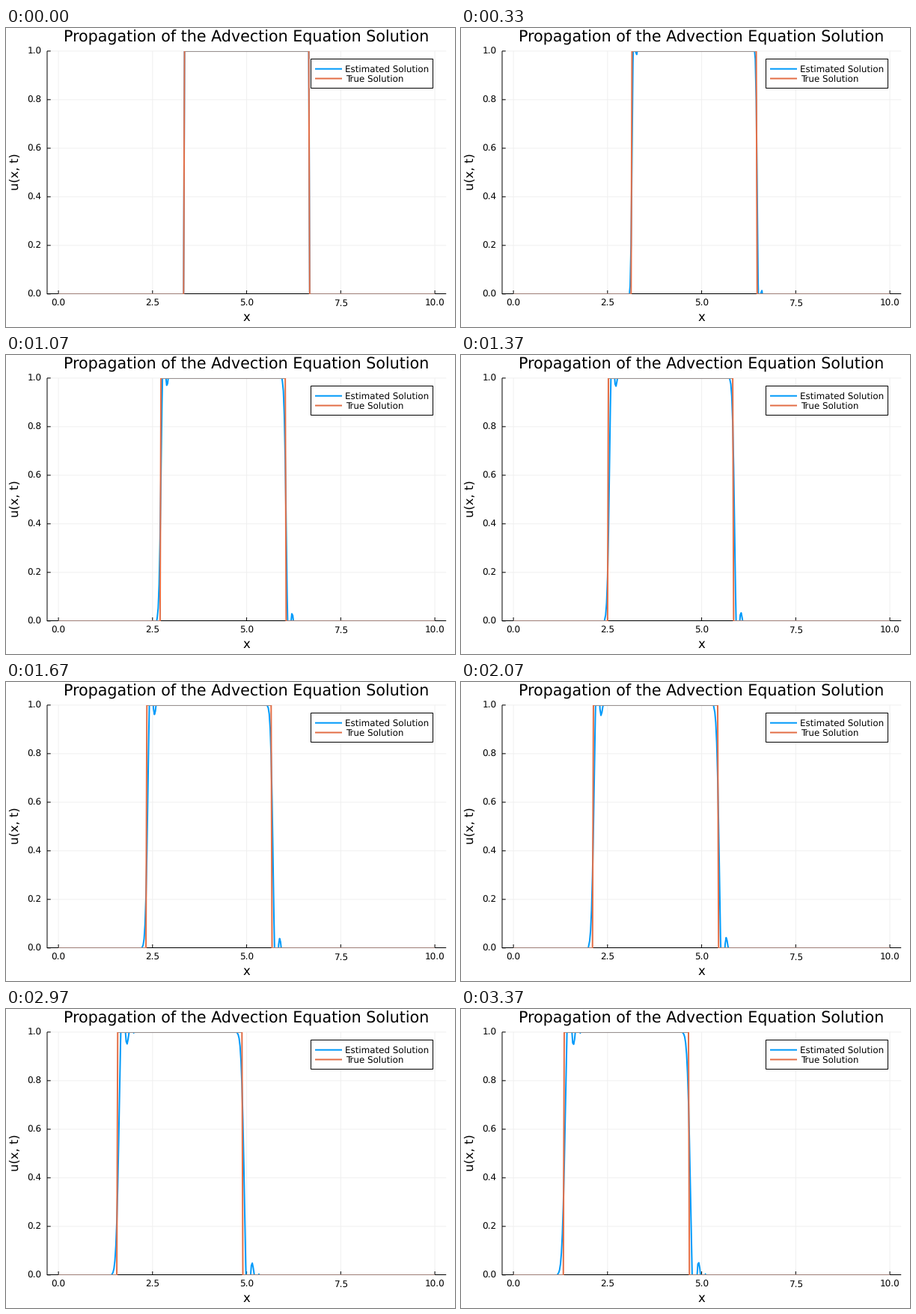
Animation, 600 px wide and 400 px high, one loop 3410 ms. Source, as a matplotlib script:

```python
import numpy as np
import matplotlib.pyplot as plt
from matplotlib.animation import FuncAnimation
from matplotlib.patches import Rectangle

plt.rcParams["font.family"] = "DejaVu Sans"
plt.rcParams["text.hinting"] = "none"
plt.rcParams["path.snap"] = False

W, H, DPI = 600, 400, 100
PX = 72 / DPI                       # points per pixel
LEFT, RIGHT, TOP, BOTTOM = 54.97, 588.19, 30.87, 355.8
BLUE, ORANGE = "#009AFA", "#E36F47"

# Advection to the left, u_t = u_x, solved with Lax-Wendroff
LENGTH, NX, T_END, NT = 10.0, 401, 2.0, 102
PULSE = 3.335, 6.66
TICK_MS, LOOP_MS = 10, 3410
x = np.linspace(0, LENGTH, NX)
dt = T_END / (NT - 1)
nu = dt / (x[1] - x[0])


def pulse(t):
    s = x + t
    return ((s >= PULSE[0]) & (s <= PULSE[1])).astype(float)


def lax_wendroff(u):
    right, left = np.roll(u, -1), np.roll(u, 1)
    return u + nu / 2 * (right - left) + nu**2 / 2 * (right - 2 * u + left)


estimates = [pulse(0)]
for _ in range(NT - 1):
    estimates.append(lax_wendroff(estimates[-1]))


def px(v):
    return LEFT + (np.asarray(v) + 0.3) / 10.6 * (RIGHT - LEFT)


def py(v):
    return BOTTOM - np.asarray(v) * (BOTTOM - TOP)


def hide_flats(u):
    """Push the flat levels just outside the clip area."""
    return np.where(u > 0.997, np.maximum(u, 1.01),
                    np.where(u < 0.003, np.minimum(u, -0.01), u))


fig = plt.figure(figsize=(W / DPI, H / DPI), dpi=DPI, facecolor="white")
ax = fig.add_axes([0, 0, 1, 1])
ax.set_xlim(0, W)
ax.set_ylim(H, 0)
ax.axis("off")


def stroke(xs, ys, color, width=1, z=2):
    return ax.plot(xs, ys, color=color, lw=width * PX, zorder=z,
                   solid_capstyle="butt")[0]


def label(cx, base, text, size, ha="center", **kw):
    ax.text(cx, base, text, fontsize=size * PX, ha=ha, va="baseline",
            zorder=8, **kw)


# Grid, ticks and tick labels
for v in np.arange(0, 10.1, 2.5):
    gx = float(px(v))
    stroke([gx, gx], [TOP, BOTTOM], "#f0f0f0", z=1)
    stroke([gx, gx], [BOTTOM, 351], "black")
    label(gx, 371.9, f"{v:.1f}", 12)
for v in np.arange(0, 1.01, 0.2):
    gy = float(py(v))
    stroke([LEFT, RIGHT], [gy, gy], "#f0f0f0", z=1)
    stroke([LEFT, 59.7], [gy, gy], "black")
    label(47.3, gy + 4.4, f"{v:.1f}", 12, ha="right")
stroke([LEFT, RIGHT], [355.5, 355.5], "black")
stroke([LEFT, LEFT], [TOP, 356], "black")

# Titles
label(321.3, 19, "Propagation of the Advection Equation Solution", 20.7)
label(321.6, 391.6, "x", 16.5)
label(17, 192.6, "u(x, t)", 16.4, rotation=90, rotation_mode="anchor")

# Legend
ax.add_patch(Rectangle((407.5, 41.5), 163, 39, fc="white", ec="black",
                       lw=PX, zorder=6))
stroke([413, 449], [54.7, 54.7], BLUE, 2, z=7)
stroke([413, 449], [67.6, 67.6], ORANGE, 2, z=7)
label(453.4, 58.9, "Estimated Solution", 11.9, ha="left")
label(454.4, 71.9, "True Solution", 11.9, ha="left")

# Moving curves, with blended strips where both lie on the plot's edge
top_strip = stroke([], [], "#98908f", z=4.5)
low_strips = [stroke([], [], "#a08078", z=4.5) for _ in range(2)]
estimate = stroke([], [], BLUE, 2, z=4)
truth = stroke([], [], ORANGE, 2, z=5)
clip = Rectangle((55, 31), 533, 325, transform=ax.transData)
for line in (estimate, truth):
    line.set_clip_path(clip)


def draw(tick):
    step = min(int((tick + 0.5) * 0.3), NT - 1)
    true_u = pulse(step * dt)
    on = np.flatnonzero(true_u)
    first, last = on[0], on[-1]
    top_strip.set_data(px([x[first], x[last]]), [31.5, 31.5])
    low_strips[0].set_data(px([0, x[first - 1]]), [355.5, 355.5])
    low_strips[1].set_data(px([x[last + 1], LENGTH]), [355.5, 355.5])
    estimate.set_data(px(x), py(hide_flats(estimates[step])))
    truth.set_data(px(x), py(hide_flats(true_u)))
    return [top_strip, *low_strips, estimate, truth]


anim = FuncAnimation(fig, draw, frames=LOOP_MS // TICK_MS, interval=TICK_MS,
                     repeat=True, repeat_delay=0, blit=False)
plt.show()
```
